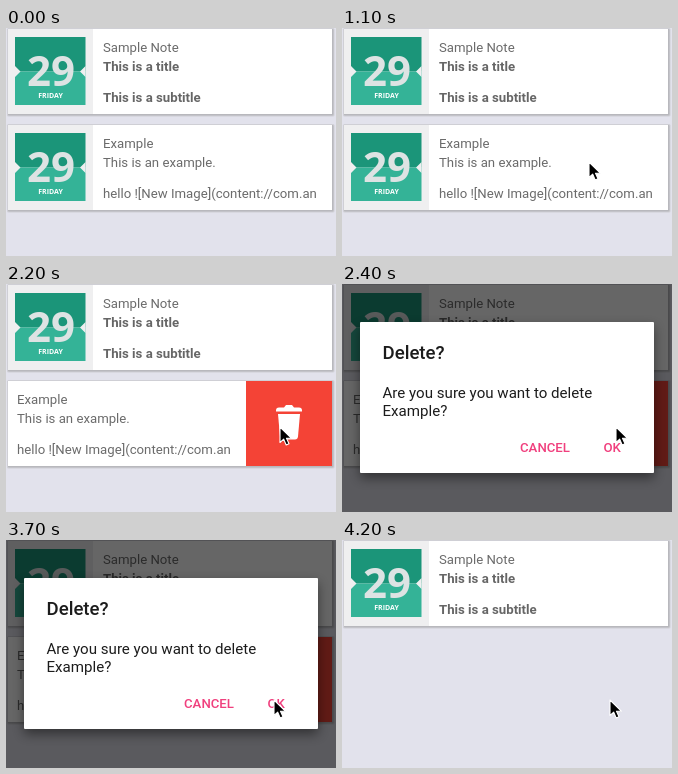
Animation of 330 by 228 pixels, one loop 4.5 s. Source, as an HTML page:

```html
<!DOCTYPE html>
<html lang="en">
<head>
<meta charset="utf-8">
<title>Swipe to delete</title>
<style>
  html, body { margin: 0; width: 100%; height: 100%; overflow: hidden; background: #e2e2ec; }
  svg { display: block; width: 100vw; height: 100vh; }
  text { font-family: Roboto, sans-serif; }
  .note text { font-size: 13.2px; fill: #6b6b6b; }
  .note .bold { font-weight: 700; fill: #666; }
  .date text { font-family: "Open Sans", sans-serif; font-weight: 700; text-anchor: middle; fill: #fff; }
  .date .day { font-size: 42px; fill: #dde3e3; }
  .date .name { font-size: 7px; }
  .body { font-size: 15.1px; fill: #1c1c1c; }
  .head { font-size: 18.6px; font-weight: 500; fill: #1c1c1c; }
  .action { font-size: 13.2px; font-weight: 500; fill: #f0407e; }
</style>
</head>
<body>
<svg viewBox="0 0 330 228" preserveAspectRatio="none">
  <defs>
    <clipPath id="cardClip"><rect x="2" y="1" width="324" height="85"/></clipPath>
    <filter id="soft" x="-20%" y="-20%" width="140%" height="150%">
      <feGaussianBlur stdDeviation="6"/>
    </filter>
    <g id="paper">
      <rect x="1" y="0" width="327.5" height="88.5" rx="1.5" fill="#cfcfd5"/>
      <rect x="2" y="1" width="325.5" height="86.5" rx="1" fill="#b8b8bd"/>
      <rect x="2" y="1" width="324" height="85" fill="#fff"/>
    </g>
    <g id="date" class="date">
      <rect x="2" y="1" width="85" height="85" fill="#efeff0"/>
      <rect x="9" y="9" width="70.5" height="34.5" fill="#1b9579"/>
      <rect x="9" y="43.5" width="70.5" height="33.5" fill="#34b397"/>
      <path d="M9 38l5.5 5.5L9 49zM79.500 38l-5.500 5.500 5.500 5.500z" fill="#efeff0"/>
      <text class="day" x="45" y="58">29</text>
      <text class="name" x="44.500" y="70">FRIDAY</text>
    </g>
  </defs>

  <rect width="330" height="228" fill="#e2e2ec"/>

  <g class="note">
    <use href="#paper"/>
    <use href="#date"/>
    <text x="97" y="24">Sample Note</text>
    <text class="bold" x="97" y="43">This is a title</text>
    <text class="bold" x="97" y="74">This is a subtitle</text>
  </g>

  <g class="note" id="second" transform="translate(0 96)">
    <use href="#paper"/>
    <g clip-path="url(#cardClip)">
      <g id="slide">
        <use href="#date"/>
        <text x="97" y="24">Example</text>
        <text x="97" y="43">This is an example.</text>
        <text x="97" y="74">hello ![New Image](content://com.an</text>
        <rect x="326" y="1" width="86" height="85" fill="#f44336"/>
        <g fill="#fff">
          <path d="M356 30.500q0-3 3-3h5l2-2.500h6l2 2.500h5q3 0 3 3v1h-26z"/>
          <path d="M358 34h22l-2 22.500q-.3 3-3 3h-12q-2.700 0-3-3z"/>
        </g>
      </g>
    </g>
  </g>

  <rect id="dim" width="330" height="228"/>

  <g id="dialog">
    <rect x="18" y="43" width="294" height="151" opacity=".45" filter="url(#soft)"/>
    <rect x="18" y="38" width="294" height="151" rx="1" fill="#fff"/>
    <text class="head" x="40.500" y="75">Delete?</text>
    <text class="body" x="40.500" y="114">Are you sure you want to delete</text>
    <text class="body" x="40.500" y="132">Example?</text>
    <text class="action" x="178" y="168">CANCEL</text>
    <text class="action" x="261.500" y="168">OK</text>
  </g>

  <path id="cursor" d="M0 0V15.500L3.700 12.200 6.200 18 9 16.800 6.500 11.200H11.300z"
        fill="#000" stroke="#fff" stroke-width="1.100" stroke-linejoin="round"/>
</svg>
<script>
  const LOOP = 4500, STEP = 100;
  const $ = id => document.getElementById(id);
  const [second, slide, dim, dialog, cursor] =
    ["second", "slide", "dim", "dialog", "cursor"].map($);

  // Each key: [time, ...values]
  const pointer = [
    [100, 297, 194], [650, 285, 174], [1100, 247, 134], [1200, 246, 135],
    [1700, 160, 139], [1800, 160, 139], [2200, 274, 143],
    [2700, 274, 143], [3300, 268, 160]
  ];
  const swipe = [[1200, 0], [1700, -86]];
  const shade = [[2200, 0], [2400, .6], [3800, .6], [4000, .22], [4100, .07], [4200, 0]];
  const popup = [[2200, 0], [2400, 1], [3800, 1], [4000, 0]];

  const ease = u => u * u * (3 - 2 * u);
  const linear = u => u;

  function at(keys, t, curve = linear) {
    const next = keys.findIndex(k => k[0] > t);
    if (next === 0) return keys[0].slice(1);
    if (next < 0) return keys[keys.length - 1].slice(1);
    const a = keys[next - 1], b = keys[next];
    const u = curve((t - a[0]) / (b[0] - a[0]));
    return a.slice(1).map((v, i) => v + (b[i + 1] - v) * u);
  }

  function draw(t) {
    const [x, y] = at(pointer, t, ease);
    cursor.setAttribute("transform", `translate(${x} ${y})`);
    cursor.setAttribute("visibility", t < 100 ? "hidden" : "visible");
    slide.setAttribute("transform", `translate(${at(swipe, t, ease)[0]} 0)`);
    second.setAttribute("visibility", t < 3900 ? "visible" : "hidden");
    dim.setAttribute("opacity", at(shade, t)[0]);
    dialog.setAttribute("opacity", at(popup, t)[0]);
  }

  const start = performance.now();
  function tick(now) {
    const t = Math.max(0, now - start) % LOOP;
    draw(Math.floor(t / STEP) * STEP);
    requestAnimationFrame(tick);
  }
  draw(0);
  requestAnimationFrame(tick);
</script>
</body>
</html>
```
